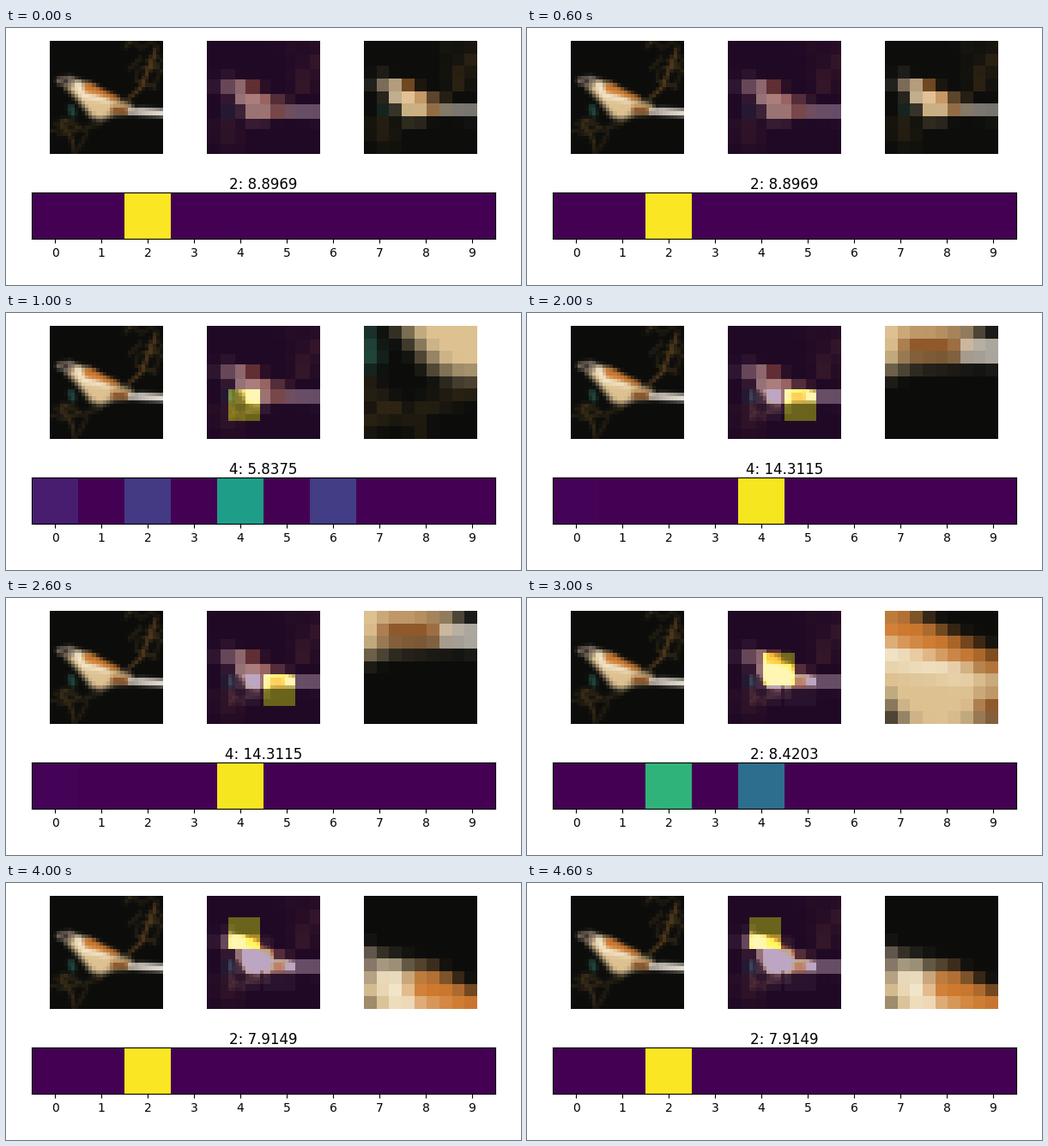
Write a matplotlib script that moves like this. It is 600 by 300 pixels and loops after 5000 ms.

```python
import numpy as np
import matplotlib.pyplot as plt
from matplotlib.animation import FuncAnimation

N, G = 32, 9          # picture size and glimpse size, in cells
RES = N * G           # fine grid divides evenly into both
TINT = 0.35

axis = (np.arange(RES) + 0.5) / G
gx, gy = np.meshgrid(axis, axis)
scene = np.full((RES, RES, 3), [13, 14, 12], float)
rng = np.random.default_rng(4)


def limb(color, *spine, soft=0.8, alpha=1.0):
    """Paint a tapered, soft-edged band along (x, y, radius) points."""
    knots = np.linspace(0, 1, len(spine))
    along = np.linspace(0, 1, 48)
    gap = np.full((RES, RES), np.inf)
    for x, y, r in zip(*(np.interp(along, knots, v) for v in zip(*spine))):
        gap = np.minimum(gap, np.hypot(gx - x, gy - y) - r)
    cover = alpha * np.clip(0.5 - gap / soft, 0, 1)[..., None]
    scene[:] += cover * (np.array(color) - scene)


def twigs(cx, cy, count):
    for _ in range(count):
        x, y = rng.normal((cx, cy), 3.2)
        turn, size = rng.uniform(0, np.pi), rng.uniform(1, 3)
        dx, dy = size * np.cos(turn), size * np.sin(turn)
        brown = np.array((88, 66, 32)) * rng.uniform(0.7, 1.1)
        limb(brown, (x - dx, y - dy, 0.4), (x + dx, y + dy, 0.4), alpha=0.5)


def shrink(img, n):
    k = RES // n
    return img.reshape(n, k, n, k, 3).mean(axis=(1, 3))


# foliage
twigs(6, 25.5, 14)
twigs(27, 5, 14)
limb((110, 74, 32), (22, 16.5, 0.4), (26, 13, 0.5), (28, 8, 0.5), (30, 2, 0.4),
     alpha=0.8)
limb((34, 72, 62), (6, 19, 0.9), (6.4, 20.5, 0.9), soft=1.2)

# bird: body, breast, wing, rump, tail, head, eye
limb((222, 194, 146), (6.3, 12.6, 1.6), (10, 14.8, 2.8), (14, 18.6, 3.5),
     (18, 18.6, 2.1), (22, 19.2, 1.2), soft=2.2)
limb((243, 231, 204), (8, 12.6, 1), (9.8, 15.2, 1.1), (16, 16.7, 0.7), soft=1.6)
limb((207, 121, 46), (11, 13.3, 1.3), (14, 14.4, 1), (19, 16.3, 0.6), soft=1.5)
limb((138, 80, 34), (18.2, 19.6, 0.9), (21.2, 19.6, 0.9), soft=1.5)
limb((236, 228, 216), (22.6, 20, 0.6), (26, 20, 0.9), (32, 20.4, 0.9), soft=1.2)
limb((128, 113, 102), (2.8, 11.4, 0.9), (5.6, 11.4, 1.4), soft=1.2)
limb((50, 40, 34), (4, 11.6, 0.5), (4.6, 11.5, 0.5))

scene /= 255
image, coarse = shrink(scene, N), shrink(scene, G)

# glimpse corner (column, row), class scores, winning logit
steps = [
    (None, {2: 0.995}, "8.8969"),
    ((6, 18), {0: 0.08, 2: 0.17, 4: 0.56, 6: 0.18}, "5.8375"),
    ((16, 18), {0: 0.01, 4: 0.985}, "14.3115"),
    ((10, 12), {2: 0.65, 4: 0.36}, "8.4203"),
    ((6, 6), {2: 0.995}, "7.9149"),
]


def look(corner):
    col, row = corner
    return np.s_[row:row + G, col:col + G]


def overlay(i):
    """Coarse view plus every glimpse so far, tinted by the current window."""
    cells = np.arange(N) * G // N
    seen = coarse[np.ix_(cells, cells)]
    focus = np.zeros((N, N))
    for corner, *_ in steps[1:i + 1]:
        seen[look(corner)] += image[look(corner)]
    if steps[i][0]:
        focus[look(steps[i][0])] = 1
    tint = plt.cm.viridis(focus)[..., :3]
    return (1 - TINT) * np.clip(seen, 0, 1) + TINT * tint


fig = plt.figure(figsize=(6, 3), dpi=100, facecolor="white")
grid = fig.add_gridspec(2, 3, left=0.05, right=0.95, bottom=0.05, top=0.95,
                        hspace=0.05, wspace=0.05)


def picture(col, data):
    ax = fig.add_subplot(grid[0, col])
    ax.axis("off")
    return ax.imshow(data, interpolation="nearest")


picture(0, image)
memory = picture(1, overlay(0))
glimpse = picture(2, coarse)

bar = fig.add_subplot(grid[1, :])
scores = bar.imshow(np.zeros((1, 10)), vmin=0, vmax=1, cmap="viridis",
                    interpolation="nearest")
bar.set_xticks(range(10))
bar.set_yticks([])
title = bar.set_title("", pad=1)


def draw(i):
    corner, probs, logit = steps[i]
    row = np.zeros((1, 10))
    row[0, list(probs)] = list(probs.values())
    memory.set_data(overlay(i))
    glimpse_data = image[look(corner)] if corner else coarse
    glimpse.set_data(glimpse_data)
    scores.set_data(row)
    title.set_text(f"{row.argmax()}: {logit}")
    return memory, glimpse, scores, title


anim = FuncAnimation(fig, draw, frames=len(steps), interval=1000, repeat=True)
plt.show()
```
